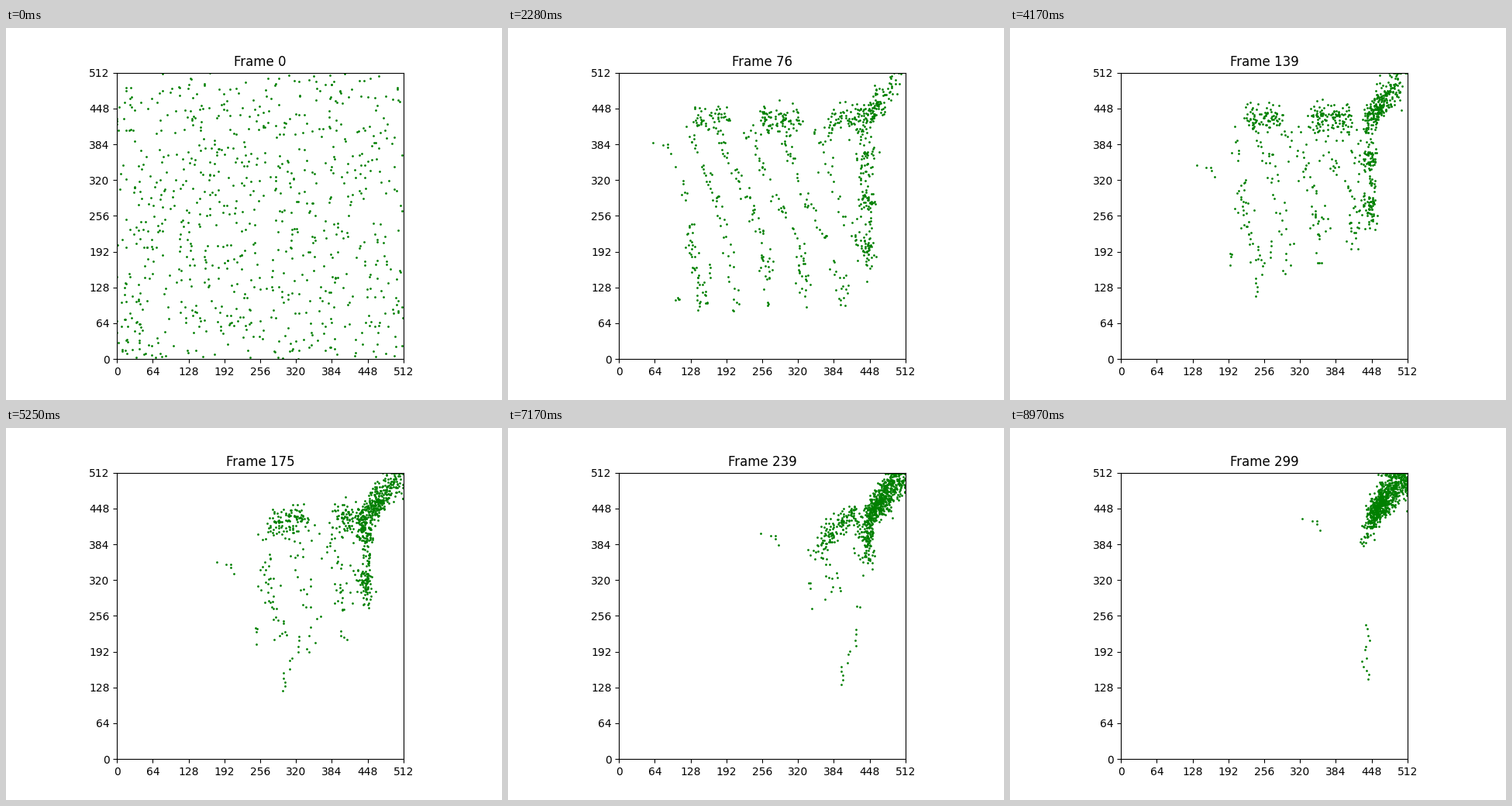
A matplotlib script for the animation above (9000 ms loop, 640 by 480 pixels).

```python
import numpy as np
import matplotlib.pyplot as plt
from matplotlib.animation import FuncAnimation

SIZE, FRAMES = 512, 300
COUNT, TAIL, LAG = 790, 12, 5
WALL = 448
VX, VY = 1.42, 1.2

rng = np.random.default_rng(11)
start = rng.uniform(0, SIZE, (COUNT, 2))
speed = rng.normal([VX, VY], [0.04, 0.07], (COUNT, 2))
wall = rng.normal([445, 433], [6, 13], (COUNT, 2))
settle = 30 + rng.exponential(7, COUNT)
reach = rng.choice([14, 46], COUNT) + rng.normal(0, 7, COUNT)
side = rng.normal(0, 1, COUNT)
phase = rng.uniform(0, 2 * np.pi, COUNT)
tail_scatter = rng.normal(0, 24, (TAIL, 2))
tail_jitter = rng.normal(0, 3.5, (TAIL, 2))
lag_offset = rng.normal(0, [8, 26], (LAG, 2))


def ramp(v):
    v = np.clip(v, 0, 1)
    return v * v * (3 - 2 * v)


def sigmoid(v):
    return 1 / (1 + np.exp(-v))


def soft_min(a, b, s):
    return -s * np.logaddexp(-a / s, -b / s)


def pull(v, period, amount):
    """Shift towards the nearest multiple of the period."""
    return -amount * ((v + period / 2) % period - period / 2)


def flock(t):
    """Drift up and right, gather in strands, pile up at the margins."""
    x0, y0 = np.minimum(start, 400).T
    x = x0 + speed[:, 0] * t
    y = y0 + speed[:, 1] * t
    gather = ramp(t / 36)

    at_wall = sigmoid((x - 435) / 10)
    y = y + gather * at_wall * (65 + 12 * np.sin(2 * np.pi * y0 / 85))
    at_top = sigmoid((y - 425) / 12)

    bend = x0 + 0.3 * y0 + 12 * np.sin(y0 / 45 + x0 / 90)
    strand = pull(bend, 58, 0.76)
    clump = pull(x0 - 55, 123, 0.42)
    x = x + gather * ((1 - at_top) * strand + at_top * clump)

    flank = np.clip(1 - (x - VX * t - 10) / 60, 0, 1)
    sag = 50 * flank * (1 - at_wall) * ramp((t - 140) / 80)
    excess = np.maximum(np.minimum(x, y) - WALL, 0)
    corner = (reach + t / 40) * (1 - np.exp(-excess / 40))
    across = side * corner * 0.2 * np.cos(0.03 * t + phase)
    sway = np.sin(0.05 * t + phase)

    px = soft_min(x, wall[:, 0] + 3 * sway, 7)
    py = soft_min(y, wall[:, 1] - sag + 5 * sway, 9)
    return np.column_stack([px + corner + across,
                            py + 1.25 * corner - across])


def tail(t):
    """A sparse string of boids below the flock."""
    k = np.arange(TAIL)
    grow = ramp(t / 110)
    x = 18 + 1.57 * t + 3 * grow * k
    y = 5 + 95 * (1 - np.exp(-t / 60)) + 0.13 * t + (3 + 6 * grow) * k
    line = np.column_stack([soft_min(x, 438, 10), y])
    spread = ramp(t / 39)
    return line + spread * tail_jitter + (1 - spread) * tail_scatter


def laggards(t):
    """A few boids left behind, bobbing along on their own."""
    centre = [1.18 * t - 8, 392 - 42 * np.sin(2 * np.pi * (t - 76) / 290)]
    return centre + lag_offset


origin = flock(0)


def positions(t):
    late = 1 - ramp(t / settle)[:, None]
    body = flock(t) + late * (start - origin)
    return np.clip(np.vstack([body, tail(t), laggards(t)]), 0, SIZE - 1)


fig, ax = plt.subplots(figsize=(6.4, 4.8), dpi=100)
ax.set(xlim=(0, SIZE), ylim=(0, SIZE), aspect="equal")
ax.set_xticks(range(0, SIZE + 1, 64))
ax.set_yticks(range(0, SIZE + 1, 64))
dots, = ax.plot([], [], "o", color="green", markersize=1)
title = ax.set_title("Frame 0")


def update(i):
    dots.set_data(*positions(i).T)
    title.set_text(f"Frame {i}")
    return dots, title


anim = FuncAnimation(fig, update, frames=FRAMES, interval=30,
                     repeat=True, repeat_delay=0, blit=False)
plt.show()
```
